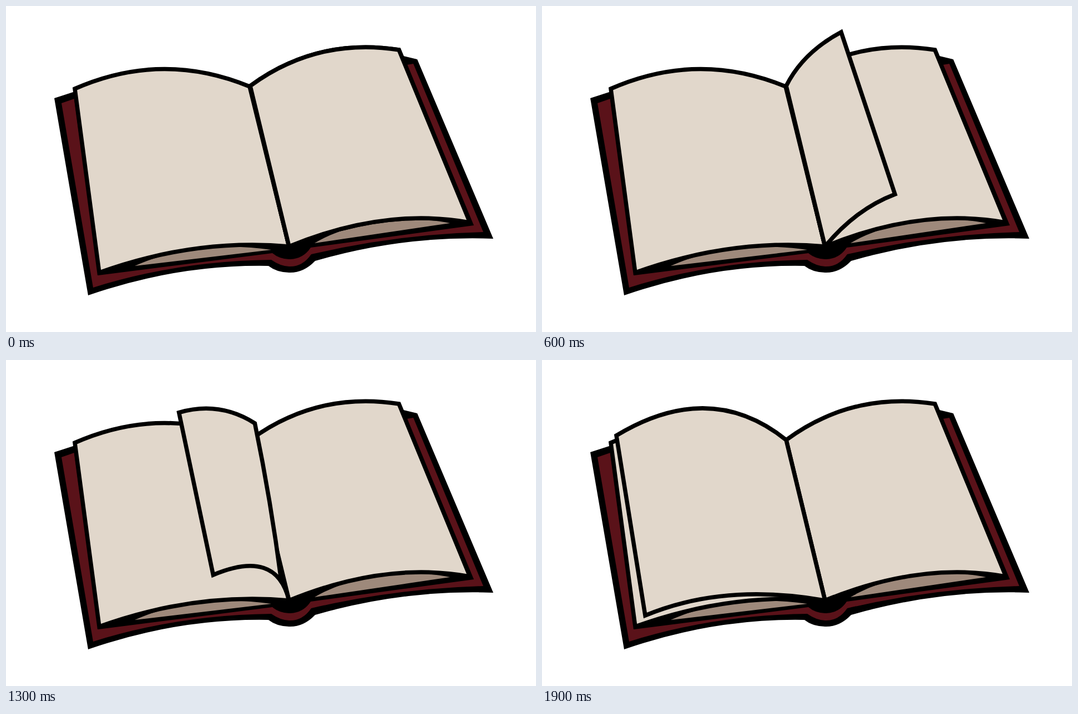
An HTML page that plays this animation: 955 px wide and 587 px high, repeating every 2000 ms.

```html
<!DOCTYPE html>
<html lang="en">
<head>
<meta charset="utf-8">
<title>Turning page</title>
<style>
  html, body { margin: 0; height: 100%; overflow: hidden; background: #fff; }
  svg { display: block; width: 100%; height: 100%; }
  .cover { fill: #5a1219; }
  .shade { fill: #9e897b; }
  .page { fill: #e1d7cb; stroke: #000; stroke-width: 7.5; }
</style>
</head>
<body>
<svg viewBox="0 0 955 587">
  <path d="M87 166L121 155L440 143L716 90L741 96L878 419Q715 413 557 459Q537 480 512 480Q488 480 473 468Q310 465 148 521Z"/>
  <path class="cover" d="M100 175L123 167L440 143L722 106L734 104L860 407Q705 411 550 447Q535 469 512 469Q495 469 478 457Q310 459 157 507Z"/>
  <path d="M122 160L166 485L480 445Q493 456 512 456Q536 455 549 435L843 395L721 103L712 85L440 143Z"/>
  <path class="shade" d="M232 468C300 437 390 426 478 439ZM556 427C620 389 720 374 800 391Z"/>
  <path class="page" d="M510 433L439 145Q281 80 124 149L168 480Q340 418 510 433Z"/>
  <path class="page" id="rightPage"/>
  <path class="page" id="turningPage"/>
</svg>
<script>
const STEP_MS = 100, STEPS = 20, CURL_STEP = 11;
const SPINE_TOP = [440, 144], SPINE_END = [510, 433];

// Key poses of the loose page. `arc` bends the height of its corners on the
// way to the next pose: positive rises early, negative falls late.
const poses = [
  { step: 0, arc: 2.6, outer: [708, 79], topBend: [560, 56], corner: [836, 390], lowBend: [683, 362] },
  { step: 6, arc: 0, outer: [539, 47], topBend: [470, 84], corner: [636, 339], lowBend: [565, 366] },
  { step: 11, arc: 0, outer: [381, 90], topBend: [415, 72], corner: [470, 357], lowBend: [606, 345] },
  { step: 14, arc: -1, outer: [277, 97], topBend: [369, 74], corner: [325, 402], lowBend: [428, 336] },
  { step: 19, arc: 0, outer: [134, 136], topBend: [303, 34], corner: [186, 460], lowBend: [328, 401] }
];

const mix = (a, b, t) => a + (b - a) * t;
const mixPoint = (a, b, tx, ty = tx) => [mix(a[0], b[0], tx), mix(a[1], b[1], ty)];
const quadAt = (a, b, c, t) => mixPoint(mixPoint(a, b, t), mixPoint(b, c, t), t);
const peak = (step, reach) => Math.max(0, 1 - Math.abs(step - CURL_STEP) / reach);

function pagePath(step) {
  const next = Math.max(1, poses.findIndex(pose => pose.step >= step));
  const from = poses[next - 1], to = poses[next];
  const t = (step - from.step) / (to.step - from.step);
  const height = t + from.arc * t * (1 - t);

  const outer = mixPoint(from.outer, to.outer, t, height);
  const corner = mixPoint(from.corner, to.corner, t, height);
  const topBend = mixPoint(from.topBend, to.topBend, t);
  const lowBend = mixPoint(from.lowBend, to.lowBend, t);

  // While the page curls over, its fold leaves the spine and climbs the bottom edge.
  const lift = peak(step, 5), curl = peak(step, 3);
  const inner = [SPINE_TOP[0] + 14 * lift, SPINE_TOP[1] - 50 * lift];
  const foldEnd = quadAt(corner, lowBend, SPINE_END, 1 - .64 * curl);
  const middle = mixPoint(inner, foldEnd, .5);
  const foldBend = [middle[0] + 16 * curl, middle[1] - 5 * curl];

  return `M${foldEnd}Q${foldBend} ${inner}Q${topBend} ${outer}L${corner}Q${lowBend} ${SPINE_END}`;
}

const rightPage = document.getElementById('rightPage');
const turningPage = document.getElementById('turningPage');
rightPage.setAttribute('d', pagePath(0));

function draw(now) {
  turningPage.setAttribute('d', pagePath(Math.floor(now / STEP_MS) % STEPS));
  requestAnimationFrame(draw);
}
draw(0);
</script>
</body>
</html>
```
